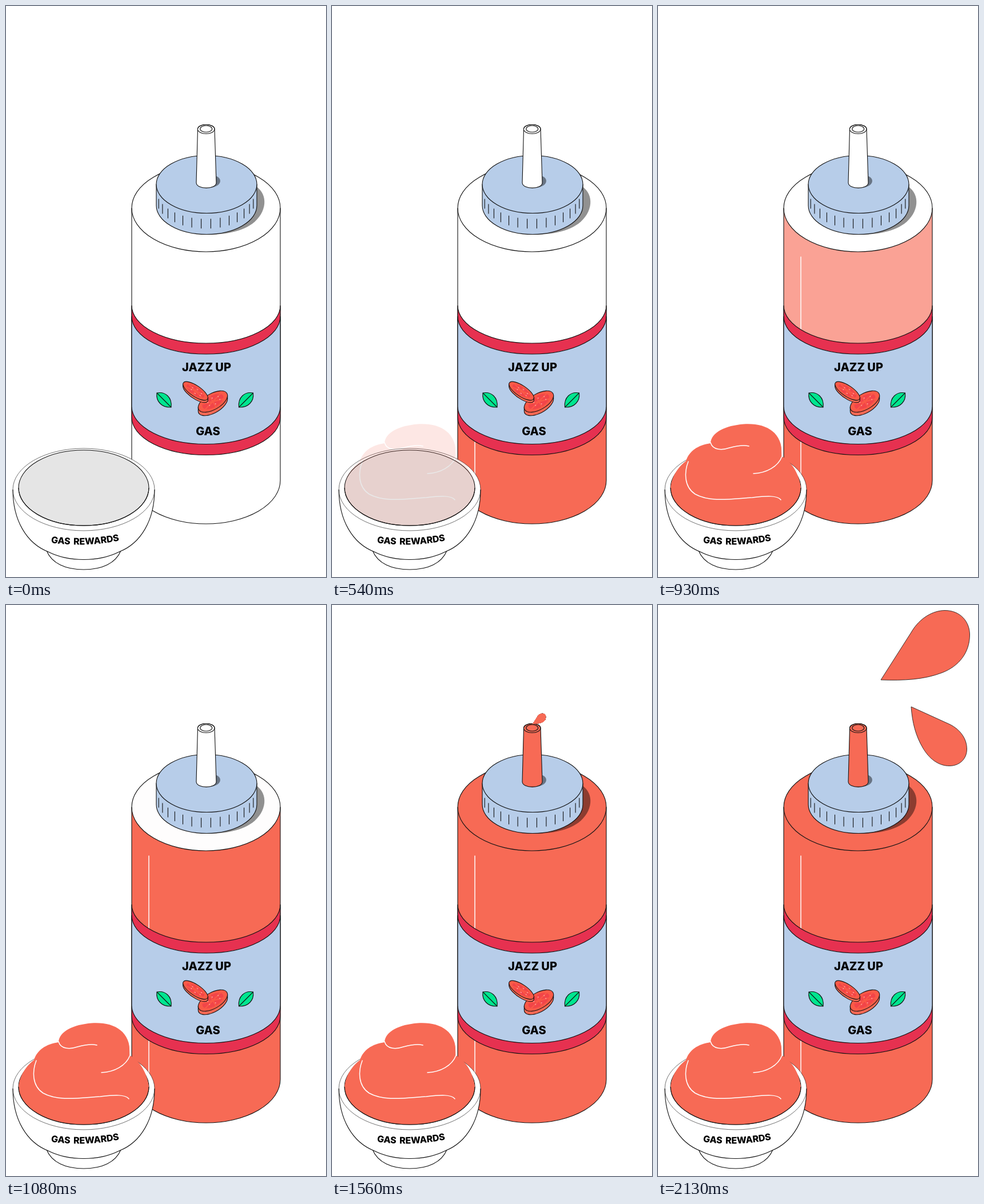
Recreate the animation shown at these times as an HTML page. Size 560x999 px, loop 2.7 s.

```html
<!DOCTYPE html>
<html lang="en">
<head>
<meta charset="utf-8">
<title>Sauce bottle</title>
<style>
  html, body { margin: 0; width: 100%; height: 100%; overflow: hidden; background: #fff; }
  svg { display: block; width: 560px; height: 999px; }
  text { font: 800 20px Inter, "Open Sans", sans-serif; text-anchor: middle; fill: #000; }
  .small { font-size: 16px; word-spacing: 2px; }

  .line { fill: none; stroke: #111; stroke-width: 1.1; }
  .edge { stroke: #111; stroke-width: 1.1; }
  .shine { fill: none; stroke: #fff; stroke-width: 1.5; stroke-linecap: round; }
  .sauce { fill: #f76a55; }
  .blue { fill: #b7cde9; }
  .band { fill: #e63150; }
  .leaf { fill: #00e58f; }
  .white { fill: #fff; }
  .shade { fill: #000; fill-opacity: .43; }

  /* One 2.7 s loop: base, bowl, body, shoulder, nozzle, splash */
  .base, .mound, .body, .shoulder, .nozzle, .drop { animation: 2.7s linear infinite; }
  .base { animation-name: base; }
  .mound { animation-name: mound; }
  .body { animation-name: body; }
  .shoulder { animation-name: shoulder; }
  .nozzle { animation-name: nozzle; }
  .big { animation-name: big; transform-origin: 344px 221.6px; }
  .little { animation-name: little; transform-origin: 405px 223px; }

  @keyframes base { 0%, 4.44% { opacity: 0 } 17.78%, 100% { opacity: 1 } }
  @keyframes mound { 0%, 18.96% { opacity: 0 } 25.85%, 100% { opacity: 1 } }
  @keyframes body { 0%, 27.2% { opacity: 0 } 38.9%, 100% { opacity: 1 } }
  @keyframes shoulder { 0%, 40% { opacity: 0 } 46.1%, 100% { opacity: 1 } }
  @keyframes nozzle { 0%, 45.9% { opacity: 0 } 55.6%, 100% { opacity: 1 } }
  @keyframes big {
    0%, 55.56% { transform: scale(0) }
    57.78% { transform: scale(.15) }
    64.44% { transform: scale(.46) }
    71.11% { transform: scale(.8); animation-timing-function: cubic-bezier(.33, .67, .67, 1) }
    78.89%, 100% { transform: scale(1) }
  }
  @keyframes little {
    0%, 59.3% { transform: scale(0) }
    64.44% { transform: scale(.29) }
    71.11% { transform: scale(.735); animation-timing-function: cubic-bezier(.33, .67, .67, 1) }
    78.89%, 100% { transform: scale(1) }
  }
</style>
</head>
<body>
<svg viewBox="0 0 560 999">
  <defs>
    <path id="tube" d="M335.5 215 L333 309 C333 321.500 368 321.500 368 309 L365 215 A14.750 7.500 0 0 0 335.500 215Z"/>
    <path id="curve" d="M74 938.500 Q138 948 203 934.500"/>
    <g id="leaf">
      <path class="leaf edge" d="M264 677 C279 674 291 685 289 702 C273 703 262 692 264 677Z"/>
      <path class="line" d="M264 677 L289 702"/>
    </g>
  </defs>

  <!-- Bottle -->
  <path class="white" d="M220 353.500 A130 76.500 0 0 1 480 353.500 V830 A130 76 0 0 1 220 830Z"/>
  <g class="base">
    <path class="sauce" d="M220 715 H480 V830 A130 76 0 0 1 220 830Z"/>
    <path class="shine" d="M250 755 V835"/>
  </g>
  <g class="body">
    <path class="sauce" d="M220 353.500 A130 76.500 0 0 0 480 353.500 V600 H220Z"/>
    <path class="shine" d="M250 439 V590"/>
  </g>
  <ellipse class="sauce shoulder" cx="350" cy="353.500" rx="130" ry="76.500"/>
  <ellipse class="line" cx="350" cy="353.500" rx="130" ry="76.500"/>
  <path class="line" d="M220 353.500 V830 A130 76 0 0 0 480 830 V353.500"/>

  <!-- Label -->
  <path class="band edge" d="M220 524 A130 66 0 0 0 480 524 V719.500 A130 66 0 0 1 220 719.500Z"/>
  <path class="blue edge" d="M220 543 A130 66 0 0 0 480 543 V700.500 A130 66 0 0 1 220 700.500Z"/>
  <text x="351" y="639">JAZZ UP</text>
  <text x="353.500" y="750.500">GAS</text>
  <use href="#leaf"/>
  <use href="#leaf" transform="translate(696.500) scale(-1 1)"/>
  <g id="slices"></g>

  <!-- Cap -->
  <path class="shade" d="M438 316 C459 330 457 361 431 381 C408 397 378 400 350 400Z"/>
  <path class="blue edge" d="M263 312 V349 A88 50.500 0 0 0 439 349 V312Z"/>
  <ellipse class="blue edge" cx="351" cy="312" rx="88" ry="50.500"/>
  <path class="line" id="ridges"/>

  <!-- Nozzle -->
  <path class="shade" d="M366 297 C377 300 378 310 368 315 C362 318 355 318.500 350 318Z"/>
  <use href="#tube" class="white"/>
  <use href="#tube" class="sauce nozzle"/>
  <use href="#tube" class="line"/>
  <ellipse class="line" cx="350.200" cy="215.500" rx="14.800" ry="8"/>
  <ellipse class="line" cx="350.200" cy="215" rx="10.500" ry="5.800"/>

  <!-- Splash -->
  <path class="drop big sauce" stroke="#111" stroke-width=".8" d="M390 131 L443 48 C458 22 482 9.500 502 9.500 C530 9.500 545.500 30 545.500 52 C545.500 83 527 107 497 118.500 C466 130.500 430 132.500 390 131Z"/>
  <path class="drop little sauce" stroke="#111" stroke-width=".8" d="M443 178 L511 209 C529 218 540.500 234 540.500 252 C540.500 270 527 281.500 510 281.500 C490 281.500 474 268 463.500 250 C451 229 445 206 443 178Z"/>

  <!-- Bowl -->
  <path class="white edge" d="M71 953 C80 975 104 986 136 986 C168 986 192 975 201 953Z"/>
  <path class="white" d="M12 846 A124 72 0 0 1 260 846 C260 900 236 940 198 955 C162 973 110 973 74 955 C36 940 12 900 12 846Z"/>
  <path class="line" d="M12 846 C12 900 36 940 74 955 C110 973 162 973 198 955 C236 940 260 900 260 846"/>
  <ellipse class="line" cx="136" cy="846" rx="124" ry="72" style="stroke-width:.6"/>
  <ellipse class="edge" cx="136" cy="843" rx="114" ry="66" fill="#e5e5e5"/>
  <g class="mound">
    <path class="sauce" d="M22 843 C24 822 36 806 49 796 C54 779 70 768 92 765 C93 746 118 734 150 731.500 C190 729 219 746 217 788 C236 799 247 820 250 843 A114 66 0 0 1 22 843Z"/>
    <path class="shine" d="M92 764 C96 778 113 777 125 773 C140 769 150 768 159 770 M216 765 C217 774 217 781 217 788 C210 806 190 817 167 818 M53 797 C46 815 45 841 65 854 C92 869 130 862 165 860 C190 857 209 856 215 864"/>
  </g>
  <path class="line" d="M22 843 A114 66 0 0 0 250 843"/>
  <text class="small"><textPath href="#curve" startOffset="50%">GAS REWARDS</textPath></text>
</svg>
<script>
  // Ridges follow the front edge of the cap
  let ridges = '';
  for (let i = -6.5; i <= 6.5; i++) {
    const a = i * 11.1 * Math.PI / 180;
    const x = 350 + 87 * Math.sin(a);
    const y = 322 + 50.5 * Math.cos(a);
    ridges += `M${x.toFixed(1)} ${y.toFixed(1)}v17`;
  }
  document.getElementById('ridges').setAttribute('d', ridges);

  // A tilted disc with a wall of the given depth below it
  function slice(x, y, rx, ry, turn, depth) {
    const tilt = turn * Math.PI / 180;
    const sideX = Math.hypot(rx * Math.cos(tilt), ry * Math.sin(tilt));
    const sideY = (rx * rx - ry * ry) * Math.sin(tilt) * Math.cos(tilt) / sideX;
    const ring = (k, attrs) => `<ellipse rx="${rx * k}" ry="${ry * k}" ${attrs}/>`;
    let seeds = '';
    for (let i = 0; i < 6; i++) {
      const a = (i + .5) * Math.PI / 3;
      const px = rx * Math.cos(a), py = ry * Math.sin(a);
      seeds += `<path d="M0 0L${px * .75} ${py * .75}" stroke="#fa5a47" stroke-width="2"/>` +
        `<circle cx="${px * .42 + 2}" cy="${py * .42}" r="1" fill="#ff9d9d"/>`;
    }
    return `<g transform="translate(${x} ${y})">
      <path class="sauce edge" d="M${-sideX} ${-sideY}v${depth}A${rx} ${ry} ${turn} 0 0 ${sideX} ${sideY + depth}v${-depth}Z"/>
      <g transform="rotate(${turn})">${ring(1, 'fill="#fa5a47" class="edge"')}${ring(.72, 'fill="#f24549"')}${seeds}</g>
    </g>`;
  }
  document.getElementById('slices').innerHTML =
    slice(362, 692, 28.5, 14, -30, 6) + slice(331.5, 673.5, 25.5, 9.5, 34, 4);
</script>
</body>
</html>
```
